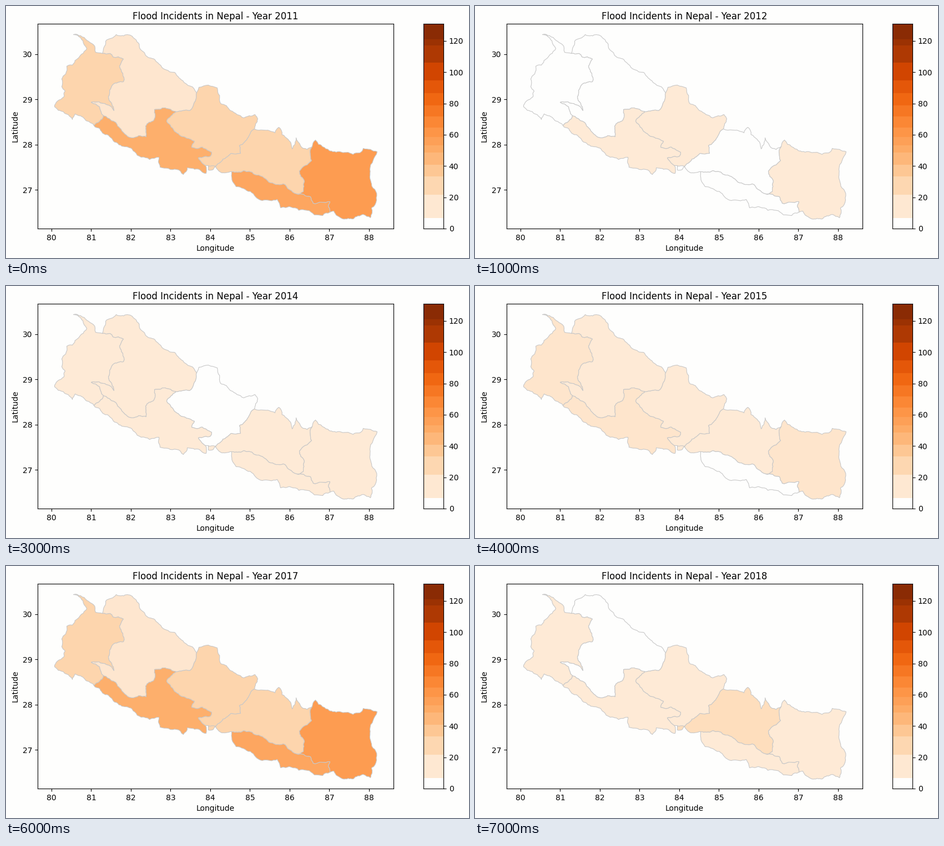
A matplotlib script that plays this animation: 834 px wide and 454 px high, repeating every 8 s.

```python
import numpy as np
import matplotlib.pyplot as plt
from matplotlib.animation import FuncAnimation
from matplotlib.patches import Polygon

W, H = 834, 454
LEFT, TOP, RIGHT, BOTTOM = 57, 32, 697.8, 401
X80, Y30 = 81.9, 86.9            # pixel position of 80 E and 30 N
X_SCALE, Y_SCALE = 71.5, 81.5    # pixels per degree
V_MAX = 131
PAPER = "#fefefd"
rng = np.random.default_rng(7)


def lon(x):
    return 80 + (x - X80) / X_SCALE


def lat(y):
    return 30 - (y - Y30) / Y_SCALE


def rough(a, b):
    """Points from a up to b, displaced at each midpoint."""
    d = b - a
    if np.hypot(*d) < 4.5:
        return [a]
    mid = (a + b) / 2 + rng.uniform(-0.14, 0.14) * np.array([-d[1], d[0]])
    return rough(a, mid) + rough(mid, b)


def border(*keys):
    keys = np.array(keys, float) + 0.5
    points = [p for a, b in zip(keys, keys[1:]) for p in rough(a, b)]
    x, y = np.array(points + [keys[-1]]).T
    return np.column_stack([lon(x), lat(y)])


def back(line):
    return line[::-1]


# Key points of the borders; neighbours share the same line
far_west = border(
    (158, 215), (142, 204), (124, 194), (119, 204), (103, 190), (87, 181),
    (92, 171), (104, 163), (106, 153), (100, 145), (100, 131), (107, 122),
    (109, 108), (119, 106), (131, 92), (145, 76), (138, 62), (121, 51),
    (134, 53), (157, 69), (161, 83), (173, 85))
west_karnali = border(
    (173, 85), (187, 85), (192, 91), (211, 95), (204, 108), (210, 121),
    (211, 136), (192, 141), (184, 163), (194, 188), (180, 177), (153, 173),
    (168, 181), (175, 197))
west_lumbini = border((175, 197), (158, 215))
karnali_north = border(
    (173, 85), (179, 63), (198, 51), (232, 59), (243, 79), (275, 104),
    (303, 119), (318, 134), (343, 156))
karnali_gandaki = border((343, 156), (338, 175), (330, 188), (306, 190))
karnali_lumbini = border(
    (175, 197), (204, 219), (226, 237), (252, 235), (251, 216), (266, 205),
    (267, 186), (286, 183), (306, 190))
lumbini_south = border(
    (158, 215), (176, 230), (193, 243), (214, 253), (231, 262), (258, 276),
    (275, 272), (277, 290), (307, 294), (319, 303), (326, 291), (360, 301),
    (359, 287))
lumbini_gandaki = border(
    (306, 190), (289, 207), (306, 227), (339, 243), (334, 254), (370, 263),
    (368, 270), (346, 273), (359, 287))
gandaki_north = border(
    (343, 156), (347, 146), (364, 142), (380, 147), (386, 175), (404, 188),
    (428, 201), (448, 195), (453, 203), (447, 221))
gandaki_bagmati = border(
    (447, 221), (436, 236), (420, 251), (422, 265), (405, 265), (377, 288))
gandaki_south = border((377, 288), (359, 287))
bagmati_north = border(
    (447, 221), (463, 223), (484, 228), (491, 218), (508, 240), (515, 257),
    (522, 237), (530, 251), (542, 258), (551, 253))
bagmati_east = border(
    (551, 253), (550, 278), (528, 297), (537, 315), (535, 334), (523, 338))
bagmati_madhesh = border(
    (406, 298), (447, 303), (473, 317), (499, 320), (523, 338))
bagmati_west = border((406, 298), (386, 299), (377, 288))
east_outer = border(
    (551, 253), (557, 241), (588, 262), (637, 264), (643, 256), (668, 262),
    (655, 294), (658, 320), (667, 349), (656, 381), (643, 375), (606, 383),
    (590, 369), (583, 371))
east_madhesh = border(
    (523, 338), (548, 343), (553, 355), (583, 352), (583, 371))
madhesh_south = border(
    (583, 371), (570, 377), (513, 362), (494, 363), (488, 348), (461, 350),
    (414, 325), (406, 298))
enclave = border((364, 288), (377, 289), (373, 294), (364, 295))

# West to east; the enclave belongs to Bagmati
provinces = [
    [far_west, west_karnali, west_lumbini],
    [karnali_north, karnali_gandaki, back(karnali_lumbini), back(west_karnali)],
    [back(west_lumbini), karnali_lumbini, lumbini_gandaki, back(lumbini_south)],
    [gandaki_north, gandaki_bagmati, gandaki_south, back(lumbini_gandaki),
     back(karnali_gandaki)],
    [bagmati_north, bagmati_east, back(bagmati_madhesh), bagmati_west,
     back(gandaki_bagmati)],
    [bagmati_madhesh, east_madhesh, madhesh_south],
    [east_outer, back(east_madhesh), back(bagmati_east)],
    [enclave],
]

# Incidents per province in the same order
incidents = {
    2011: [29, 16, 49, 29, 29, 53, 58],
    2012: [0, 0, 12, 12, 0, 0, 12],
    2013: [44, 28, 54, 28, 28, 28, 58],
    2014: [12, 12, 12, 0, 12, 12, 12],
    2015: [17, 12, 17, 12, 12, 0, 17],
    2016: [17, 17, 46, 27, 27, 17, 76],
    2017: [29, 16, 49, 29, 29, 53, 58],
    2018: [12, 0, 12, 12, 23, 12, 12],
}
years = list(incidents)


def shade(value):
    return PAPER if value < 6 else plt.cm.Oranges(value / V_MAX)


plt.rcParams["font.family"] = "DejaVu Sans"
fig = plt.figure(figsize=(W / 100, H / 100), dpi=100, facecolor=PAPER)


def pixel_axes(left, right):
    return fig.add_axes([left / W, 1 - BOTTOM / H,
                         (right - left) / W, (BOTTOM - TOP) / H],
                        facecolor=PAPER)


ax = pixel_axes(LEFT, RIGHT)
ax.set_xlim(lon(LEFT), lon(RIGHT))
ax.set_ylim(lat(BOTTOM), lat(TOP))
ax.set_xticks(range(80, 89))
ax.set_yticks(range(27, 31))
ax.set_xlabel("Longitude")
ax.set_ylabel("Latitude")
title = ax.set_title("")
shapes = [ax.add_patch(Polygon(np.vstack(ring), edgecolor="#c8c8c8",
                               linewidth=0.8, joinstyle="round"))
          for ring in provinces]

# Colour bar in steps, each with the shade of its middle value
bar = pixel_axes(752, 788)
bar.set_xlim(0, 1)
bar.set_ylim(0, V_MAX)
bar.set_xticks([])
bar.yaxis.tick_right()
bar.set_yticks(range(0, 121, 20))
rows = np.array([401, 382, 340, 307, 286, 264, 251, 236, 219, 199, 179, 157,
                 134, 102, 71, 60, 32])
steps = (BOTTOM - rows) * V_MAX / (BOTTOM - TOP)
for low, high in zip(steps, steps[1:]):
    bar.axhspan(low, high, facecolor=shade((low + high) / 2),
                edgecolor="none", antialiased=False)


def draw(i):
    year = years[i]
    title.set_text(f"Flood Incidents in Nepal - Year {year}")
    counts = incidents[year]
    for shape, count in zip(shapes, counts + [counts[4]]):
        shape.set_facecolor(shade(count))
    return [title, *shapes]


anim = FuncAnimation(fig, draw, frames=len(years), interval=1000,
                     repeat=True, repeat_delay=0, blit=False)
plt.show()
```
